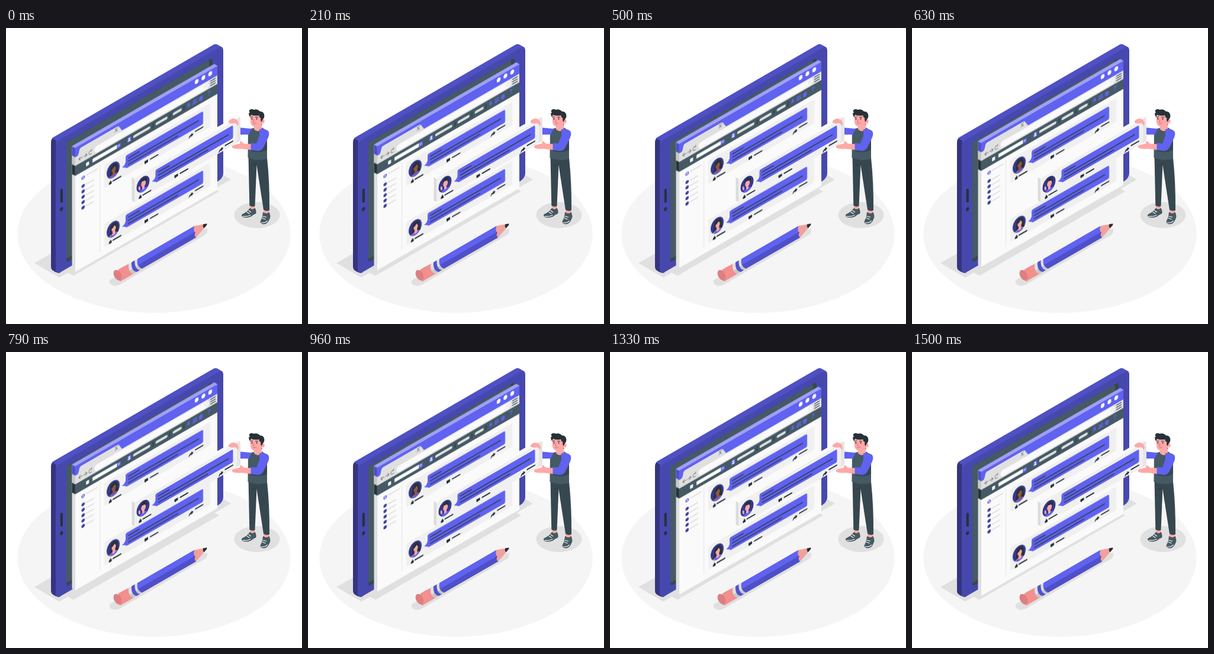
These frames come from a looping animation (500x500 px, 1540 ms). An HTML page:

```html
<!DOCTYPE html>
<html lang="en">
<head>
<meta charset="utf-8">
<title>Social feed</title>
<style>
  html, body { margin: 0; width: 100%; height: 100%; overflow: hidden; background: #fff; }
  svg { display: block; width: 100vw; height: 100vh; }
  .window { animation: float 1.54s linear infinite; }
  /* rises for 750 ms, falls for 750 ms, rests 40 ms */
  @keyframes float {
    0%, 97.4%, 100% { transform: translateY(0); }
    48.7% { transform: translateY(-10px); }
  }
  .line { fill: none; stroke-linecap: round; }
  .main { fill: #6062f0; }
  .shade { fill: #e0e0e0; }
  .skin { fill: #ffa8a7; }
  .ink { fill: #263238; }
  .slate { fill: #455a64; }
  .white { fill: #fafafa; }
  .mark { font: bold 10px Inter, sans-serif; text-anchor: middle; }
</style>
</head>
<body>
<svg viewBox="0 0 500 500">
  <defs>
    <clipPath id="disc"><ellipse cx="181" cy="344.4" rx="11" ry="12.8"/></clipPath>

    <g id="post">
      <ellipse cx="181" cy="344.4" rx="11" ry="12.8" fill="#37378c"/>
      <path class="main" d="M204 332.5H331Q333 332.5 333 335V352Q333 354.500 331 354.500H205Q203 354.500 202 352.500L196 348.500Q201 348 202 343V335Q202 332.500 204 332.500Z"/>
      <path class="line" stroke="#37415f" stroke-width="2" d="M207 338.700H225M207 344.200H325M207 349.700H290"/>
      <path class="line" stroke="#263238" stroke-width="2.100" d="M181 362.600H194M244 362.300H256.500M320 359.200H332.500"/>
      <path class="ink" d="M174 362h1.200l1-2.600q1.200 0 .9 2.400h1.400v4h-4.500zM234 360.300h6v4.400h-3l-1.600 1.600v-1.600H234z"/>
      <path class="ink" d="M308.800 366q-.2-5.600 4.300-5.800v-2l3.600 3.500-3.600 3.300v-2q-2.600 0-4.300 3z"/>
    </g>

    <g id="row">
      <circle cx="130.300" cy="342" r="2.800" fill="#4140a4"/>
      <path class="line" stroke="#e0e0e0" stroke-width="2" d="M135.500 342H148"/>
    </g>

    <g id="woman" clip-path="url(#disc)">
      <path class="ink" d="M176 344q-.5-9 6-9.500q6.500 0 6.500 8q0 6 2 10h-16q1.800-3 1.500-8.500z"/>
      <path d="M172 359q2-7 8-7.500v-4h4.500v4q5 .5 7 7.500z" fill="currentColor"/>
      <path class="main" d="M174 359q1.500-6 4.500-6.700l3.500 3 3.500-3q4 1 5 6.700z"/>
      <ellipse cx="182" cy="343.500" rx="3.700" ry="4.900" fill="currentColor"/>
      <path class="ink" d="M177.500 343q0-7 5-7q4.500 0 4.500 7q-2.500-1-3.500-4q-2 3-6 4z"/>
    </g>
  </defs>

  <!-- floor and shadows -->
  <ellipse cx="250" cy="348" rx="230.700" ry="133" fill="#f5f5f5"/>
  <path class="shade" d="M48 397L90 421.500 380 256 338 232Z"/>
  <path class="shade" d="M100 411L114 418.500 360 276 346 268Z"/>
  <ellipse class="shade" cx="424" cy="316" rx="38.500" ry="22"/>
  <path class="shade" d="M175 426Q173 433 182 435.500Q188 436 195 432L337 349Q341 345 340 339L325 342Z"/>

  <!-- tablet -->
  <path fill="#343481" d="M76 193Q76 187.500 80 185L92 190 92 413.300Q86 414 83 412L79 409.500Q76 407.500 76 403Z"/>
  <path fill="#4f50c4" d="M78 186.200Q79 185 81 184L350 28.500Q354 26 358 28.500L366 33 362 40 92 198 84.500 197Q84 193 85 190.500Z"/>
  <g transform="matrix(1 -.577 0 1 0 0)">
    <rect x="84" y="241" width="283" height="224.500" rx="8" fill="#4748ad"/>
    <rect x="102" y="252" width="247" height="203" rx="4" fill="#37474f"/>
    <rect class="slate" x="102" y="252" width="241" height="197" rx="3"/>
  </g>
  <rect class="ink" x="91.700" y="271.500" width="4.300" height="23.500" rx="2.100"/>
  <ellipse class="ink" cx="93.800" cy="306" rx="2.400" ry="3.500" transform="rotate(20 93.800 306)"/>

  <!-- browser window -->
  <g class="window">
    <g transform="matrix(1 -.577 0 1 0 0)">
      <path fill="#e0e0e0" d="M111.500 264L117 270V479.500L113 475.500Q111.500 474 111.500 472Z"/>
      <path fill="#4e4fc6" d="M111.500 264L117 270V286L111.500 280Z"/>
      <path fill="#c7c7c7" d="M111.500 280L117 286V300.500L111.500 294.500Z"/>
      <path class="ink" d="M111.500 294.500L117 300.500V317.300L111.500 311.300Z"/>
      <path fill="#a09ff6" d="M112.500 263.800H350Q352 263.800 353 265L357 270V272H117V270L111.500 264.500Z"/>
      <rect class="white" x="117" y="290" width="240" height="189.500" rx="1.500"/>
      <path class="main" d="M117 270H355Q357 270 357 273V287H117Z"/>
      <path class="shade" d="M117 286H120Q122 286 123 282L124 277.500Q124.500 275 127 275H187.500Q190 275 191 277L196 286H357V301H117Z"/>
      <g class="white">
        <ellipse cx="322" cy="276.200" rx="3.200" ry="3.800"/>
        <ellipse cx="333.500" cy="276.200" rx="3.200" ry="3.800"/>
        <ellipse cx="345" cy="276.200" rx="3.200" ry="3.800"/>
        <rect x="149.500" y="287.800" width="193" height="10.600" rx="4.500"/>
      </g>
      <g class="line" stroke="#757575" stroke-width=".9">
        <path d="M184.300 276.500l4 6M188.300 276.500l-4 6M123 292.700h6M125.500 290l-2.500 2.700 2.500 2.700M131 292.700h6M134.500 290l2.500 2.700-2.500 2.700M144.500 290.300q-4-2-4.300 2.300q.4 4.300 4.500 2.500M144.600 288v2.600h-2.200"/>
        <path stroke="#455a64" stroke-width="1.500" d="M345.500 289.300h8M345.500 293h8M345.500 296.700h8"/>
      </g>
      <path fill="none" stroke="#e0e0e0" stroke-width=".8" d="M338 289l1 2.500h2.500l-2 1.700.8 2.800-2.300-1.600-2.300 1.600.8-2.800-2-1.700h2.500z"/>

      <!-- navigation -->
      <rect class="slate" x="117" y="300.500" width="240" height="16.800"/>
      <rect x="135.300" y="306" width="5" height="6" rx="1" class="white"/>
      <rect x="146" y="305.500" width="42" height="6.200" rx="1" class="white"/>
      <rect x="187.500" y="305.500" width="6.500" height="7" rx="1" class="main"/>
      <circle cx="190.500" cy="308.500" r="1.300" fill="none" stroke="#fafafa" stroke-width=".8"/>
      <ellipse cx="208.200" cy="308.300" rx="3.700" ry="4.300" class="main"/>
      <path class="white" d="M205.700 311.300q.4-2.500 2.500-2.500t2.500 2.500z"/>
      <circle cx="208.200" cy="306.900" r="1.500" class="white"/>
      <path class="line" stroke="#e0e0e0" stroke-width="4.600" d="M217 308.300H241.500M255 308.500H270.500M284 308.500H294.500"/>
      <path class="line" stroke="#263238" stroke-width="1" d="M248.500 304.500v8M277 304.500v8M300.500 304.500v8"/>
      <g class="main">
        <path d="M305.500 310.500q1.200-1 1.200-3.500q.2-2.400 1.800-2.400t1.800 2.400q0 2.500 1.200 3.500zM307.300 311.200h2.400l-1.200 1.400z"/>
        <circle cx="317.300" cy="307" r="1.700"/>
        <circle cx="320.700" cy="306.500" r="1.700"/>
        <path d="M314.800 312.500q0-3.500 2.500-3.500t2.500 3.500zM319.200 309.200q4-1.700 4 2.800h-2.700z"/>
        <ellipse cx="329.200" cy="309" rx="3.300" ry="3.900"/>
        <text class="mark" x="343" y="312.500">?</text>
      </g>

      <!-- sidebar -->
      <path stroke="#e6e6e6" stroke-width="1.200" d="M158.500 323V469"/>
      <circle cx="130.300" cy="328" r="2.900" fill="#6062f0"/>
      <circle cx="130.300" cy="327" r="1" class="white"/>
      <path class="white" d="M128.600 329.700q1.700-2.200 3.400 0z"/>
      <path class="line" stroke="#e0e0e0" stroke-width="2" d="M136 327.300H154"/>
      <use href="#row"/>
      <use href="#row" y="9.100"/>
      <use href="#row" y="18.200"/>
      <use href="#row" y="27.300"/>
      <use href="#row" y="36.400"/>

      <!-- feed -->
      <g fill="#f0f0f0">
        <rect x="166" y="326.500" width="179" height="39.500" rx="2"/>
        <rect x="166" y="426.500" width="179" height="39.500" rx="2"/>
      </g>
      <use href="#post"/>
      <use href="#woman" color="#93544c"/>
      <use href="#post" y="100"/>
      <use href="#woman" y="100" color="#ffa8a7"/>
    </g>
  </g>

  <!-- far arm, behind the card -->
  <path class="main" d="M392 168L413 170 415 180 392 180Z"/>

  <!-- lifted card -->
  <g transform="matrix(1 -.577 0 1 0 0)">
    <path fill="#dcdcdc" d="M212.500 374.500L217.500 380V419.500L214 416Q212.500 414.500 212.500 412Z"/>
    <path class="white" d="M212.500 374.500Q213 373.400 215 373.400H388Q390 373.400 391.500 374.800L395.500 379V382H217V380Z"/>
    <rect x="217" y="379.300" width="179" height="40" rx="2.500" fill="#f0f0f0"/>
    <path fill="#e6e6e6" d="M385.500 378H393.500Q396 379 396 382V416.800Q396 419.300 393.500 419.300H389Q391 414 390 385Z"/>
    <g transform="translate(50.500 53)">
      <use href="#post"/>
      <g clip-path="url(#disc)">
        <path class="main" d="M172 359q1-7 8-7.500h4q6 .5 7 7.500z"/>
        <path class="skin" d="M179.500 347h4v5q-2 3-4 0zM174 351l-1-5 1.500-2 1.600 2 .4 5z"/>
        <ellipse class="skin" cx="181.700" cy="343.700" rx="3.900" ry="5"/>
        <path class="ink" d="M177 342q-1-7.500 4.500-8q6.500-.5 6 7.500l-1.500 2-1-3.500q-4.500 0-6-2z"/>
      </g>
    </g>
  </g>

  <!-- man -->
  <g>
    <path class="skin" d="M412 297h8v13h-8zM435 305h9v13h-9z"/>
    <g class="slate" stroke="#263238" stroke-width=".7">
      <path d="M412 304.500Q416 309 420.500 304.500L422 309V313Q417 315 414 318Q408 321 401 319.500Q397 318 399 315Q408 311 412 304.500Z"/>
      <path d="M434.500 311.500Q440 316 444.500 311.500L446 318Q446 321 444 324Q442 330 436 331Q430 331 430 327Q434 320 434.500 311.500Z"/>
    </g>
    <path class="line" stroke="#fafafa" stroke-width="1.200" d="M407 311l4 2.500M410 308.500l3.500 2.500M400 318.200q7 1 13-2M434 318l5.500 1.500M433 321l5 2M431.500 328.800q6 1 10-3"/>
    <path fill="#37474f" d="M409.500 217L441 219Q445.500 262 445 308Q440 310.500 435 307L426.500 252Q424 236 423.500 231L420.500 301Q416 303 411.300 300Z"/>
    <path class="line" stroke="#263238" stroke-width=".8" d="M423.500 229q-3 3-8 3"/>
    <path class="slate" d="M409 173L419 168.500 433 168.500 441 174 441 221Q425 226 408.500 219Z"/>
    <path fill="#37474f" d="M414 206L426 207.500Q432 207 435 202L441 190V206Q430 212 414 208Z"/>
    <path class="main" d="M409 171L417 169Q412 174 410 181L408 180Z"/>
    <path class="skin" d="M419 161L432 157 432 170Q425 178 419 171Z"/>
    <path class="skin" d="M412.500 147Q414 141 423 141Q433 142 433 153Q432 164 423.500 167Q415.500 168 413 160Z"/>
    <ellipse class="skin" cx="433.700" cy="157.500" rx="3" ry="3.700"/>
    <path class="ink" d="M410 144L412 143Q409.500 140 412 138Q415 136 418 138Q425 136 429 141Q435 141 436 146Q437.500 151 434 154L431.500 159Q429.500 156 430.500 152Q427.500 151.500 427.500 147.500Q419 149 414 146.500Q412.500 148 412.500 151Q410 148 410 144Z"/>
    <ellipse class="ink" cx="415.500" cy="153.500" rx=".9" ry="1.300"/>
    <ellipse class="ink" cx="423.500" cy="153.500" rx=".9" ry="1.300"/>
    <path class="line" stroke="#263238" stroke-width="1" d="M413.500 151l3-1M421.500 150.500l4 .3M431.500 162.500l1 .7"/>
    <path class="line" stroke="#c96b70" stroke-width=".9" d="M419 154.500l-1.500 4 2 .3M417.500 161.500q3 1.500 5.500-1"/>
    <path class="skin" d="M416 196L402 195.500 397 191Q394.500 190.500 395.500 195L384 198Q381 199 382 202Q386 205 398 204L415 206Z"/>
    <path class="main" d="M428 171Q437 169 443 174Q446 179 442 187L434 203Q431 207.500 425 207.500L413.500 206V194.500L423 195 428 182Z"/>
    <path class="skin" d="M376 157.500Q379 153 385 153L390 155Q393 158 393 162L391.500 166Q390 162 387 160.500Q382 162 377 160.500Q375 159 376 157.500Z"/>
  </g>

  <!-- pencil -->
  <g transform="matrix(1 -.577 0 1 0 0)">
    <path fill="#f28f8f" d="M190 517.500Q192 517 208 518Q206 532 217 539.500H193Q184 530 190 517.500Z"/>
    <path fill="#e0e0e0" d="M207 518H224L231 539.500H216Q206 532 207 518Z"/>
    <path fill="#c7c7c7" d="M209 530H226L231 539.500H216Q211 535 209 530Z"/>
    <path fill="#5253cd" d="M212 518H217.500Q217 532 226 539.500H221Q211 532 212 518Z"/>
    <path class="main" d="M222 518H318L322 530H223Q221 525 222 518Z"/>
    <path fill="#4f50c8" d="M223 529H321V539.200H230Q225 535 223 529Z"/>
    <path fill="#f2a09b" d="M318 518L339 526 338.500 529 321 539.200Q317 533 320 530Q316 526 318 518Z"/>
    <path class="ink" d="M333 523.700L338.500 525.800Q340.500 527.200 338.500 529L334.500 531.300Q332 528 333 523.700Z"/>
  </g>
  <ellipse cx="188.500" cy="417.500" rx="6" ry="9.500" fill="#dd7f80" transform="rotate(-28 188.500 417.500)"/>
</svg>
</body>
</html>
```
